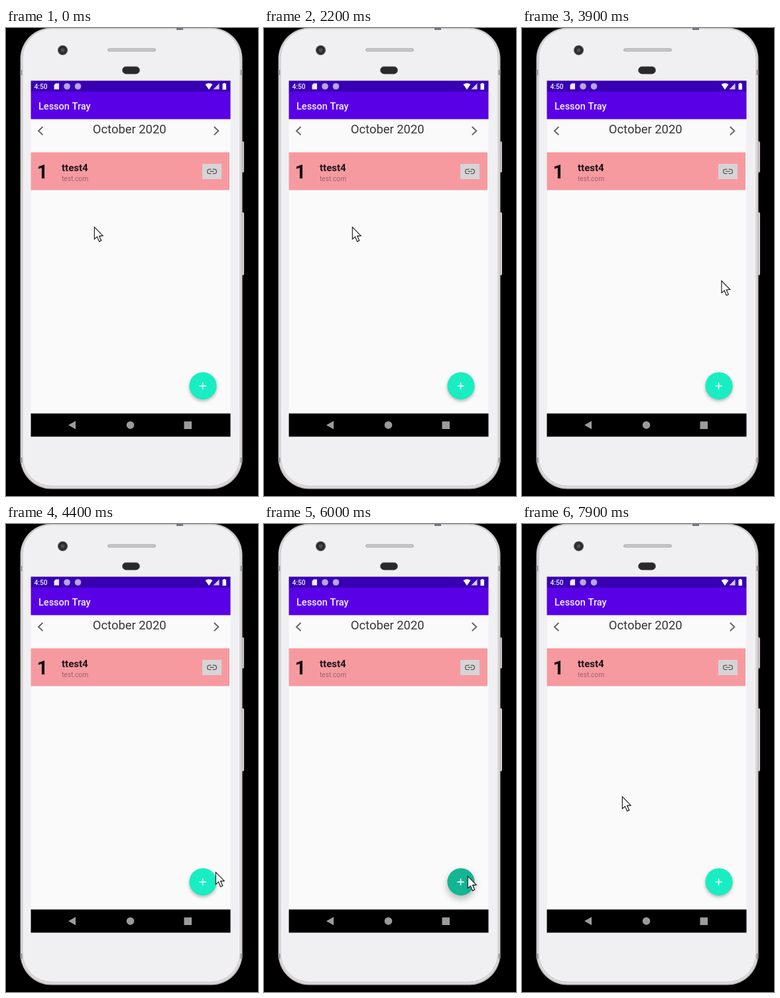
Animation, 380 px wide and 706 px high, one loop 8 s. Source, as an HTML page with a canvas:

```html
<!DOCTYPE html>
<html lang="en">
<head>
<meta charset="utf-8">
<title>Phone planner</title>
<style>
html, body { margin: 0; width: 100%; height: 100%; overflow: hidden; background: #000; }
canvas { display: block; width: 380px; height: 706px; }
</style>
</head>
<body>
<canvas id="stage"></canvas>
<script>
const W = 380, H = 706, LOOP = 8000, STEP = 100;
const canvas = document.getElementById('stage');
const dpr = window.devicePixelRatio || 1;
canvas.width = Math.round(W * dpr);
canvas.height = Math.round(H * dpr);
const c = canvas.getContext('2d');

// Pointer tip: time, x, y
const path = [
  [0, 133, 300], [3300, 133, 300], [3800, 298, 355], [4200, 315, 522],
  [4400, 316, 525], [4900, 316, 525], [5100, 307, 531], [6200, 307, 531],
  [6800, 207, 445], [7400, 207, 445], [7900, 151, 411]
];

const clamp = v => Math.max(0, Math.min(1, v));
const ease = v => { v = clamp(v); return v * v * (3 - 2 * v); };

function pointerAt(t) {
  for (let i = 1; i < path.length; i++) {
    const [t0, x0, y0] = path[i - 1], [t1, x1, y1] = path[i];
    if (t <= t1) {
      const k = ease((t - t0) / (t1 - t0));
      return [x0 + (x1 - x0) * k, y0 + (y1 - y0) * k];
    }
  }
  return path[path.length - 1].slice(1);
}

function rect(x, y, w, h, fill) {
  c.fillStyle = fill;
  c.fillRect(x, y, w, h);
}

function round(x, y, w, h, r, fill, stroke, lw = 1) {
  c.beginPath();
  c.roundRect(x, y, w, h, r);
  if (fill) { c.fillStyle = fill; c.fill(); }
  if (stroke) { c.strokeStyle = stroke; c.lineWidth = lw; c.stroke(); }
}

function disc(x, y, r, fill) {
  c.beginPath();
  c.arc(x, y, r, 0, Math.PI * 2);
  c.fillStyle = fill;
  c.fill();
}

function poly(points, fill) {
  c.beginPath();
  points.forEach(([x, y]) => c.lineTo(x, y));
  c.closePath();
  c.fillStyle = fill;
  c.fill();
}

function line(points, color, width) {
  c.beginPath();
  points.forEach(([x, y], i) => i ? c.lineTo(x, y) : c.moveTo(x, y));
  c.strokeStyle = color;
  c.lineWidth = width;
  c.stroke();
}

function text(str, x, y, size, weight, color) {
  c.font = `${weight} ${size}px Roboto, "Liberation Sans", sans-serif`;
  c.fillStyle = color;
  c.fillText(str, x, y);
}

function drawPhone() {
  rect(0, 0, W, H, '#000');
  round(354, 171, 5, 47, 2, '#c4bfc2');
  round(354, 278, 5, 95, 2, '#d4d0d2');
  round(21.5, -0.5, 335, 696, 47, '#b9b4b7');
  round(22.7, 0.5, 332.6, 693.5, 46, '#dedadc');
  for (const y of [63, 648]) {
    rect(21.5, y, 3, 8, '#99959a');
    rect(353.5, y, 3, 8, '#99959a');
  }
  round(25, 1, 328, 690, 44, '#f0eff1', '#cbc7ca', 1);
  rect(257, 0, 10, 3, '#77747a');

  disc(85.5, 33.5, 7.6, '#5b5b5f');
  disc(85.5, 33.5, 6.4, '#2b2b2e');
  disc(85.5, 33.5, 3, '#4d4d51');
  round(153.5, 31, 72, 4, 2, '#c9c7c9', '#aaa7aa', 1);
  round(175.5, 58.2, 26, 11, 5.5, '#29292b', '#4c4c4f', 0.6);
}

function drawStatus() {
  rect(37.5, 79.5, 301, 16.5, '#3900b2');
  text('4:50', 42.5, 91.5, 10.2, 500, '#f0eafc');
  poly([[75, 83.5], [80, 83.5], [80, 92.5], [72.5, 92.5], [72.5, 86]], '#eee8fb');
  disc(92, 88, 4.8, '#b9a5e4');
  disc(108.5, 88, 4.8, '#b9a5e4');

  c.beginPath();
  c.moveTo(306, 93);
  c.lineTo(300.5, 85);
  c.quadraticCurveTo(306, 81.5, 311.5, 85);
  c.closePath();
  c.fillStyle = '#fff';
  c.fill();
  poly([[312.5, 92.5], [321.5, 83.5], [321.5, 92.5]], '#d6caf0');
  rect(326.5, 84, 5.5, 9, '#fff');
  rect(328, 83, 2.5, 1, '#fff');
}

function drawLinkIcon() {
  c.strokeStyle = '#565656';
  c.lineWidth = 1.3;
  c.beginPath();
  for (const side of [-1, 1]) {
    c.moveTo(310.5 + side * 1.2, 213.2);
    c.lineTo(310.5 + side * 3.7, 213.2);
    c.arc(310.5 + side * 3.7, 216.4, 3.2, -Math.PI / 2, Math.PI / 2, side < 0);
    c.lineTo(310.5 + side * 1.2, 219.6);
  }
  c.moveTo(307.5, 216.4);
  c.lineTo(313.5, 216.4);
  c.stroke();
}

function drawScreen() {
  rect(37.5, 79.5, 301, 537, '#fafafa');
  drawStatus();
  rect(37.5, 96, 301, 41.5, '#5900e6');
  text('Lesson Tray', 49, 122.5, 14.5, 500, '#f6f1ff');

  text('October 2020', 130.8, 159, 18.4, 400, '#363636');
  line([[55.5, 149], [49, 155.2], [55.5, 161.4]], '#656565', 2);
  line([[313.8, 149], [320.3, 155.2], [313.8, 161.4]], '#656565', 2);

  rect(37.5, 187.5, 299.5, 57, '#f69aa0');
  text('1', 46.5, 227, 29.5, 700, '#151011');
  text('ttest4', 84, 215.5, 15, 700, '#1e1517');
  text('test.com', 84, 231, 10.2, 400, '#99656a');
  rect(296, 205, 29, 23, '#d6d4d5');
  drawLinkIcon();

  rect(37.5, 581.5, 301, 35, '#000');
  poly([[94, 599], [105, 592.8], [105, 605.2]], '#9b9b9b');
  disc(187.5, 599, 5.8, '#9b9b9b');
  rect(268.5, 593.5, 11.5, 11.5, '#9b9b9b');
}

function drawAdd(press) {
  const mix = (a, b) => Math.round(a + (b - a) * press);
  c.save();
  c.shadowColor = 'rgba(0,0,0,.28)';
  c.shadowBlur = (5 + 6 * press) * dpr;
  c.shadowOffsetY = (2.5 + 2.5 * press) * dpr;
  disc(297, 539.8, 20.6, `rgb(${mix(24, 19)},${mix(238, 181)},${mix(193, 146)})`);
  c.restore();
  line([[291.4, 540], [301.8, 540]], '#effffb', 1.6);
  line([[296.6, 534.8], [296.6, 545.2]], '#effffb', 1.6);
}

function drawPointer([x, y]) {
  c.save();
  c.translate(x + 0.3, y + 0.3);
  c.scale(1.04, 1.04);
  poly([[0, 0], [0, 17.5], [4, 14], [7, 21], [10, 19.7], [7, 13], [12.3, 12.6]], '#fff');
  c.strokeStyle = '#161616';
  c.lineWidth = 1.1;
  c.stroke();
  c.restore();
}

function draw(now) {
  const t = Math.floor((now % LOOP) / STEP) * STEP;
  const press = ease((t - 5400) / 400) * (1 - ease((t - 6200) / 500));
  c.setTransform(dpr, 0, 0, dpr, 0, 0);
  drawPhone();
  drawScreen();
  drawAdd(press);
  drawPointer(pointerAt(t));
}

const start = performance.now();
function tick() {
  draw(performance.now() - start);
  requestAnimationFrame(tick);
}
tick();
</script>
</body>
</html>
```
